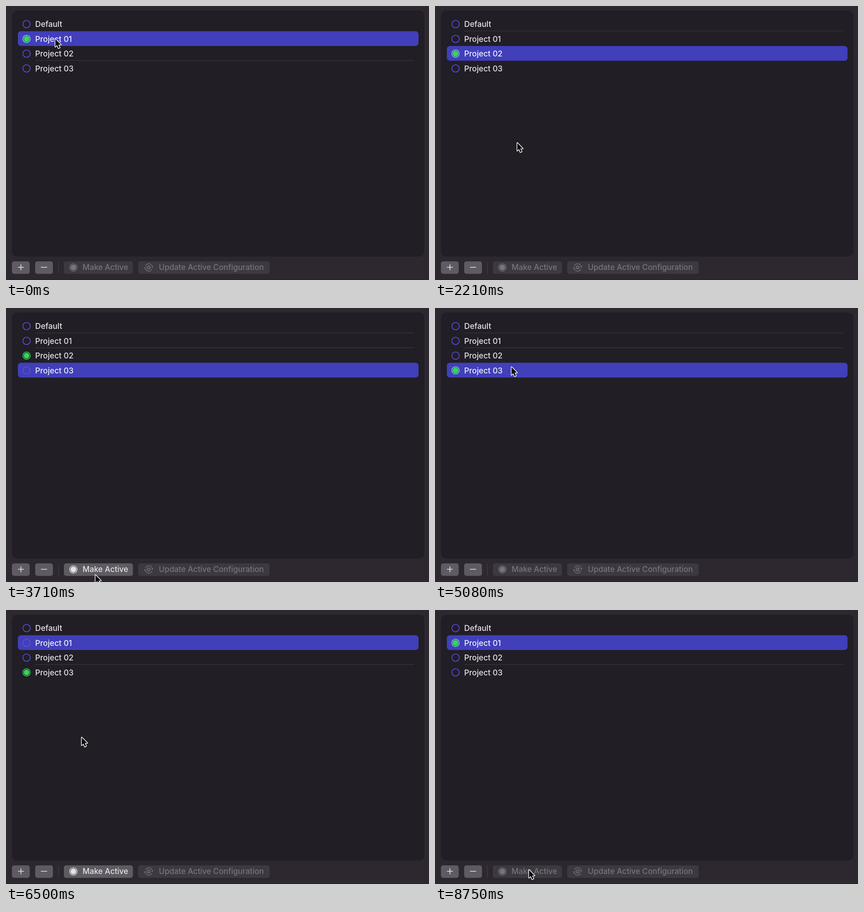
Recreate the animation shown at these times as an HTML page with a canvas. Size 928 by 603 pixels, loop 8.98 s.

```html
<!DOCTYPE html>
<html lang="en">
<head>
<meta charset="utf-8">
<title>Configuration list</title>
<style>
  html, body { margin: 0; width: 100%; height: 100%; overflow: hidden; background: #2d2830; }
  canvas { display: block; }
</style>
</head>
<body>
<canvas id="stage" width="928" height="603"></canvas>
<script>
const ctx = document.getElementById('stage').getContext('2d');
const LOOP = 8980;
const ROWS = ['Default', 'Project 01', 'Project 02', 'Project 03'];
const ROW_TOP = 23, ROW_HEIGHT = 32.5;

const CHOICES = [
  { row: 1, selectAt: 0, activateAt: 0 },
  { row: 2, selectAt: 520, activateAt: 1800 },
  { row: 3, selectAt: 2720, activateAt: 4300 },
  { row: 1, selectAt: 6080, activateAt: 7820 }
];

// Pointer trips between the list and the button, each eased from the previous stop
const POINTER_START = { x: 107, y: 71 };
const TRIPS = [
  { from: 80, to: 400, x: 108, y: 90 },
  { from: 570, to: 1540, x: 189, y: 565 },
  { from: 1780, to: 2530, x: 173, y: 131 },
  { from: 2720, to: 3710, x: 195, y: 586 },
  { from: 3920, to: 4040, x: 197, y: 580 },
  { from: 4710, to: 5140, x: 165, y: 104 },
  { from: 5140, to: 5250, x: 145, y: 59 },
  { from: 5420, to: 5580, x: 136, y: 69 },
  { from: 6100, to: 7000, x: 205, y: 570.5 }
];
const ARROW = new Path2D('M1.2 1.6V18.8L5.1 15L8 21.9L11 20.6L8.1 13.9H13.4Z');

const rowAt = (event, t) => CHOICES.filter(choice => choice[event] <= t).pop().row;

const ease = u => u * u * (3 - 2 * u);

function pointerAt(t) {
  let { x, y } = POINTER_START;
  for (const trip of TRIPS) {
    const progress = (t - trip.from) / (trip.to - trip.from);
    const k = ease(Math.min(1, Math.max(0, progress)));
    x += (trip.x - x) * k;
    y += (trip.y - y) * k;
  }
  return { x, y };
}

function box(x, y, w, h, radius, color) {
  ctx.fillStyle = color;
  ctx.beginPath();
  ctx.roundRect(x, y, w, h, radius);
  ctx.fill();
}

function ring(x, y, radius, width, color, from = 0, to = 2 * Math.PI) {
  ctx.strokeStyle = color;
  ctx.lineWidth = width;
  ctx.beginPath();
  ctx.arc(x, y, radius, from, to);
  ctx.stroke();
}

function dot(x, y, radius, color) {
  ctx.fillStyle = color;
  ctx.beginPath();
  ctx.arc(x, y, radius, 0, 2 * Math.PI);
  ctx.fill();
}

function label(text, x, y, color, size) {
  ctx.font = `500 ${size}px Inter, sans-serif`;
  ctx.fillStyle = color;
  ctx.fillText(text, x, y);
}

function drawRow(name, i, selected, active) {
  const top = ROW_TOP + i * ROW_HEIGHT, middle = top + ROW_HEIGHT / 2 + 0.6;
  const isSelected = i === selected, next = i + 1;
  if (isSelected) box(26, top, 879, ROW_HEIGHT, 6.5, '#413fba');
  if (i === active) {
    ring(45.1, middle, 8.1, 1.5, isSelected ? '#79dcae' : '#35d85a');
    dot(45.1, middle, 6.1, '#35d85a');
  } else {
    ring(45.1, middle, 8.1, 1.6, isSelected ? '#5b55d2' : '#5d50e6');
  }
  label(name, 64, middle + 6.2, isSelected ? '#f0f0fa' : '#e5e4e7', 17.2);
  if (next < ROWS.length && !isSelected && next !== selected) {
    box(64, top + ROW_HEIGHT - 1, 832, 1, 0, '#3e3b43');
  }
}

function drawUpdateIcon(x, y, color) {
  ctx.save();
  ctx.translate(x, y);
  ring(0, 0, 3.2, 1.4, color);
  dot(0, 0, 1, color);
  for (let i = 0; i < 8; i++) {
    ctx.rotate(Math.PI / 4);
    box(3.7, -0.6, 1.2, 1.2, 0, color);
  }
  for (let side = 0; side < 2; side++) {
    ctx.rotate(Math.PI);
    ring(0, 0, 8.2, 1.3, color, -2.7, -0.3);
    ctx.fillStyle = color;
    ctx.beginPath();
    ctx.moveTo(6, -2.2);
    ctx.lineTo(10.4, -2.2);
    ctx.lineTo(8.2, 1);
    ctx.fill();
  }
  ctx.restore();
}

function drawToolbar(canActivate) {
  const bright = '#e4e3e6', dim = '#77747a', raised = '#5e5b62', flat = '#3d3940';
  const main = canActivate ? bright : dim;
  const button = (x, width, color) => box(x, 562, width, 27.5, 5, color);

  button(13, 39, raised);
  box(26, 574.2, 13.4, 1.6, 0.8, bright);
  box(31.9, 568.3, 1.6, 13.4, 0.8, bright);
  button(64, 39, raised);
  box(76.5, 574.2, 14, 1.6, 0.8, bright);
  box(114.5, 563, 1, 26, 0, '#47434a');

  button(127, 151.5, canActivate ? raised : flat);
  ring(147.8, 575.3, 8.2, 1.4, main);
  dot(147.8, 575.3, 6.2, main);
  label('Make Active', 168, 581.3, main, 17);

  button(290, 288.5, flat);
  drawUpdateIcon(313, 575.3, dim);
  label('Update Active Configuration', 335.3, 581.3, dim, 17);
}

function drawPointer({ x, y }) {
  ctx.save();
  ctx.translate(x, y);
  ctx.lineJoin = 'round';
  ctx.lineWidth = 2.8;
  ctx.strokeStyle = '#fff';
  ctx.stroke(ARROW);
  ctx.fillStyle = '#0a0a0c';
  ctx.fill(ARROW);
  ctx.restore();
}

function draw(t) {
  const selected = rowAt('selectAt', t), active = rowAt('activateAt', t);
  box(0, 0, 928, 603, 0, '#2d2830');
  box(0, 602, 928, 1, 0, '#211f2a');
  box(13, 10, 905, 541.5, 12, '#211e26');
  ROWS.forEach((name, i) => drawRow(name, i, selected, active));
  drawToolbar(selected !== active);
  drawPointer(pointerAt(t));
}

const start = performance.now();
function tick() {
  draw((performance.now() - start) % LOOP);
  requestAnimationFrame(tick);
}
tick();
</script>
</body>
</html>
```
